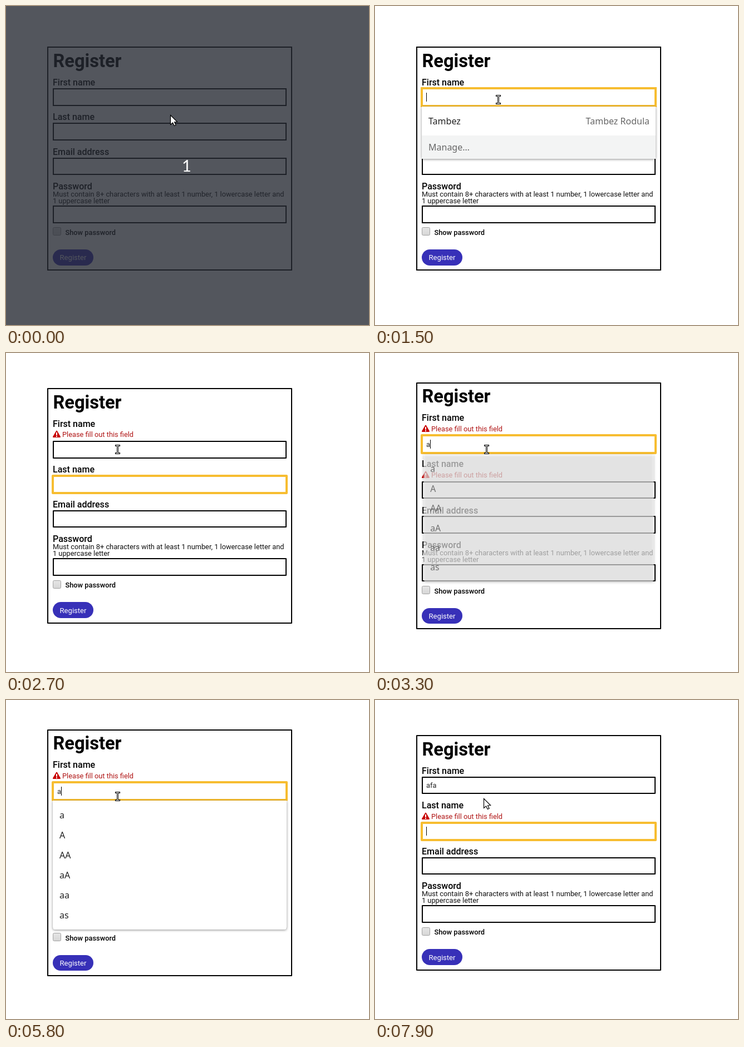
Animation of 652x574 px, one loop 8 s. Source, as an HTML page with a canvas:

```html
<!DOCTYPE html>
<html lang="en">
<head>
<meta charset="utf-8">
<title>Register form</title>
<style>
html, body { margin: 0; width: 652px; height: 574px; overflow: hidden; background: #fff; }
canvas { display: block; }
</style>
</head>
<body>
<canvas id="stage" width="652" height="574"></canvas>
<script>
const ctx = document.getElementById('stage').getContext('2d');
const LOOP = 8000, ERROR_HEIGHT = 20.5;
const UI = 'Roboto, sans-serif', MENU = '"Noto Sans", sans-serif';
const NAME = ['Tambez', 'Tambez Rodula'];
const WORDS = ['a', 'A', 'AA', 'aA', 'aa', 'as'];

// Value of the last [time, value] step that has been reached
const at = (t, steps) => steps.filter(s => s[0] <= t).pop()[1];

function text(str, x, y, font, color = '#000', align = 'left') {
  ctx.font = font;
  ctx.fillStyle = color;
  ctx.textAlign = align;
  ctx.fillText(str, x, Math.round(y));
}

function rect(x, y, w, h, color) {
  ctx.fillStyle = color;
  ctx.fillRect(x, y, w, h);
}

function frame(left, top, right, bottom, width, color) {
  ctx.strokeStyle = color;
  ctx.lineWidth = width;
  ctx.strokeRect(left + width / 2, top + width / 2, right - left - width, bottom - top - width);
}

function polygon(points) {
  ctx.beginPath();
  points.forEach(p => ctx.lineTo(...p));
  ctx.closePath();
}

function error(y) {
  y = Math.round(y);
  polygon([[91, y - 10.5], [97, y], [85, y]]);
  ctx.fillStyle = ctx.strokeStyle = '#c80000';
  ctx.lineWidth = 2;
  ctx.lineJoin = 'round';
  ctx.stroke();
  ctx.fill();
  rect(90, y - 8, 2, 5, '#fff');
  rect(90, y - 2, 2, 2, '#fff');
  text('Please fill out this field', 101, y, '12.8px ' + UI, '#b01616');
}

function input(top, focused) {
  const y0 = Math.round(top), y1 = Math.round(top + 31.5);
  if (focused) frame(82, y0 - 2, 506, y1 + 2, 4, '#f7bd30');
  else frame(84, y0, 504, y1, 2, '#000');
}

function caret(x, top) {
  rect(x, Math.round(top + 7.6), 1, 16, '#000');
}

function drawForm(s) {
  const errors = s.firstError + s.lastError;
  const y0 = 73.4 - errors * ERROR_HEIGHT / 2;
  let y = y0;
  const label = (str, dy) => text(str, 84, y + dy, '500 16px ' + UI);

  frame(74, Math.round(y0), 514, Math.round(y0 + 402.9 + errors * ERROR_HEIGHT), 2, '#000');
  text('Register', 84.5, y + 36.4, 'bold 32.6px ' + UI);

  label('First name', 69.4);
  if (s.firstError) {
    error(y + 88.2);
    y += ERROR_HEIGHT;
  }
  const first = y + 74.7;
  input(first, s.focus === 1);
  text(s.value, 92, first + 20.5, '12.8px ' + UI, '#222');
  if (s.focus === 1 && s.caret) caret([92, 99, 104, 110][s.value.length], first);
  if (s.misspelt) {
    ctx.beginPath();
    for (let x = 92; x <= 110; x += 2) ctx.lineTo(x, x % 4 ? 171.5 : 170.5);
    ctx.strokeStyle = '#e02020';
    ctx.lineWidth = 1;
    ctx.stroke();
  }

  label('Last name', 131.7);
  if (s.lastError) {
    error(y + 150.5);
    y += ERROR_HEIGHT;
  }
  const last = y + 137;
  input(last, s.focus === 2);
  if (s.focus === 2 && s.caret) caret(92, last);

  label('Email address', 194.6);
  input(y + 199.3);

  label('Password', 256.6);
  const hint = '12.8px ' + UI;
  text('Must contain 8+ characters with at least 1 number, 1 lowercase letter and', 84, y + 269.6, hint, '#111');
  text('1 uppercase letter', 84, y + 281.6, hint, '#111');
  input(y + 285.7);

  const box = Math.round(y + 325);
  const shade = ctx.createLinearGradient(0, box, 0, box + 15);
  shade.addColorStop(0, '#e6e6e6');
  shade.addColorStop(1, '#d6d6d6');
  ctx.beginPath();
  ctx.roundRect(84.5, box + .5, 14, 14, 2);
  ctx.fillStyle = shade;
  ctx.fill();
  ctx.strokeStyle = '#a2a2a2';
  ctx.lineWidth = 1;
  ctx.stroke();
  text('Show password', 106.5, y + 338.6, '500 12.8px ' + UI);

  const top = Math.round(y + 364.7), bottom = Math.round(y + 393.3);
  ctx.beginPath();
  ctx.roundRect(84, top, 73, bottom - top, 14.5);
  ctx.fillStyle = '#3730b8';
  ctx.fill();
  text('Register', 120.5, y + 383.9, '13.1px ' + UI, '#fff', 'center');
}

// Suggestion list that shrinks slightly while it fades
function drawMenu(words, alpha) {
  const top = 181, height = words ? 232 : 94, middle = top + height / 2;
  const scale = .96 + .04 * alpha;
  ctx.save();
  ctx.globalAlpha = alpha;
  ctx.translate(294, middle);
  ctx.scale(scale, scale);
  ctx.translate(-294, -middle);
  ctx.save();
  ctx.shadowColor = 'rgba(0,0,0,.45)';
  ctx.shadowBlur = 4;
  ctx.shadowOffsetY = 1;
  ctx.beginPath();
  ctx.roundRect(84, top, 420, height, [0, 0, 4, 4]);
  ctx.fillStyle = '#fff';
  ctx.fill();
  ctx.restore();
  const font = '500 16px ' + MENU;
  if (words) {
    words.forEach((w, i) => text(w, 96, 213 + 36 * i, font, '#222'));
  } else {
    rect(84, 233, 420, 42, '#f3f4f4');
    text(NAME[0], 96, 213, font, '#222');
    text(NAME[1], 493, 213, '16px ' + MENU, '#666', 'right');
    text('Manage…', 96, 260, '16px ' + MENU, '#666');
  }
  ctx.restore();
}

function drawArrow(x, y) {
  polygon([[0, 0], [0, 17], [4, 13.4], [6.8, 19], [9.6, 17.8], [7, 12.2], [12, 12]]
    .map(([dx, dy]) => [x + .5 + dx, y + .5 + dy]));
  ctx.fillStyle = '#fff';
  ctx.fill();
  ctx.strokeStyle = '#000';
  ctx.lineWidth = 1.2;
  ctx.lineJoin = 'miter';
  ctx.stroke();
}

function drawBeam(x, y) {
  for (const [grow, color] of [[1, '#000'], [0, '#fff']]) {
    const bar = (dx, dy, w, h) =>
      rect(x + dx - grow, y + dy - grow, w + 2 * grow, h + 2 * grow, color);
    bar(-3, -7, 7, 1);
    bar(0, -7, 1, 15);
    bar(-3, 7, 7, 1);
  }
}

function drawPointer(t) {
  if (t >= 7900) return drawArrow(195, 177);
  if (t >= 2300) return drawBeam(...at(t, [[2300, [212, 170]], [2400, [203, 172]], [2700, [200, 173]]]));
  const k = Math.min(1, Math.max(0, (t - 600) / 600));
  const ease = k * k * (3 - 2 * k);
  const x = Math.round(295 - 74 * ease), y = Math.round(196 - 28 * ease);
  (y < 180 ? drawBeam : drawArrow)(x, y);
}

function draw(now) {
  const t = Math.floor(now % LOOP / 100) * 100;
  rect(0, 0, 652, 574, '#fff');

  drawForm({
    firstError: t >= 1900 && t < 7500,
    lastError: t >= 3300,
    focus: at(t, [[0, 0], [1500, 1], [1900, 2], [3300, 1], [7500, 2]]),
    value: at(t, [[0, ''], [3300, 'a'], [6000, 'af'], [6300, 'afa']]),
    caret: at(t, [[0, 1], [2700, 0], [3300, 1], [4300, 0], [4600, 1], [5200, 0], [5800, 1], [6900, 0], [7500, 1]]),
    misspelt: t >= 7300 && t < 7500
  });

  const alpha = at(t, [[0, 0], [1500, 1], [1900, .95], [2000, .65], [2100, .06], [2300, .03], [2400, 0],
    [3300, .6], [3400, 1], [6000, .6], [6100, .05], [6300, 0]]);
  if (alpha) drawMenu(t < 3300 ? null : WORDS, alpha);

  if (t < 300) {
    rect(0, 0, 652, 574, 'rgba(37,41,50,.79)');
    text('1', 324.5, 298, '29px Lato, sans-serif', '#fff', 'center');
  }
  drawPointer(t);
  requestAnimationFrame(tick);
}

const start = performance.now();
function tick() {
  draw(performance.now() - start);
}
tick();
</script>
</body>
</html>
```
